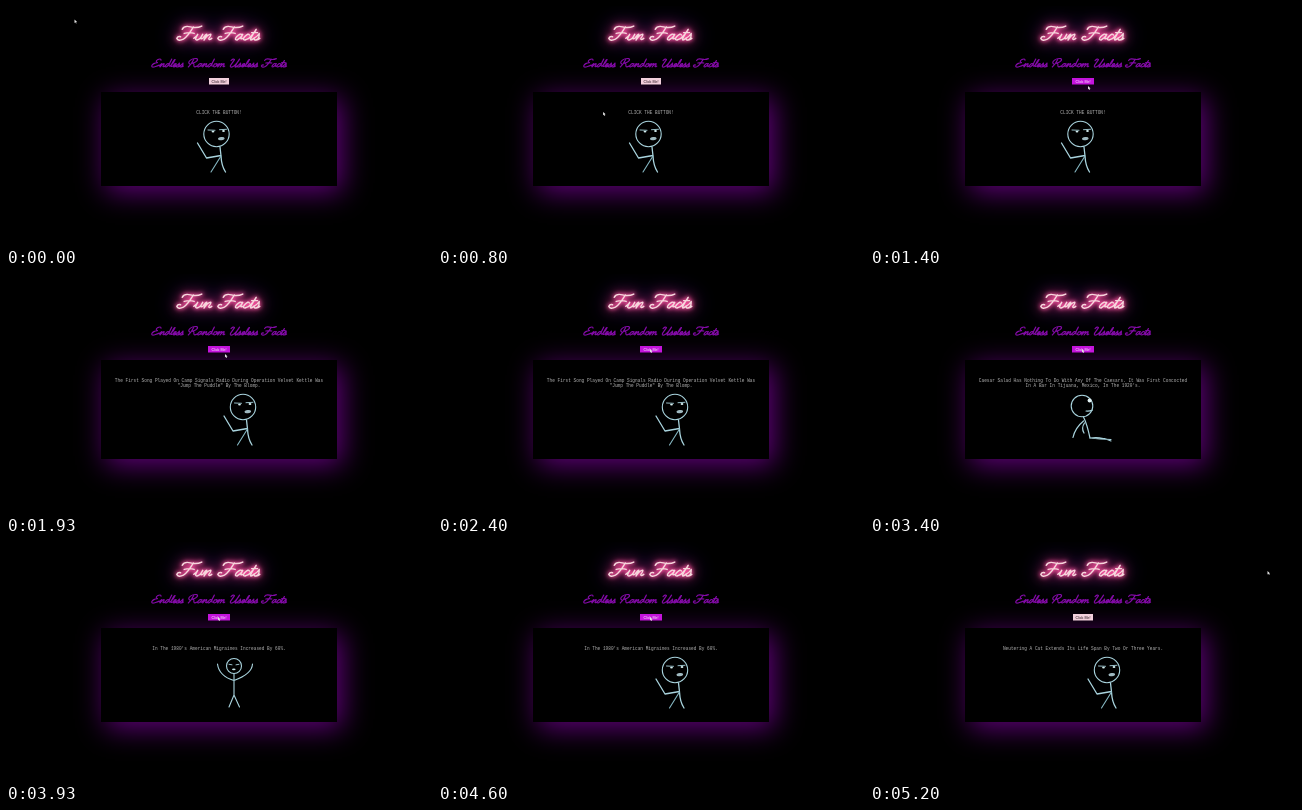
Write an HTML page with a canvas that moves like this. It is 426x240 px and loops after 5270 ms.

```html
<!DOCTYPE html>
<html lang="en">
<head>
<meta charset="utf-8">
<title>Fun Facts</title>
<style>
html, body { margin: 0; width: 100%; height: 100%; overflow: hidden; background: #000; }
canvas { display: block; width: 426px; height: 240px; }
</style>
</head>
<body>
<canvas id="stage" width="426" height="240" role="img" aria-label="Fun Facts: Endless Random Useless Facts"></canvas>
<script>
const ctx = document.getElementById('stage').getContext('2d');
const LOOP = 5270;

// Script lettering: advance width and pen strokes, baseline at 0.
const glyphs = {
  F: [17, 'M1 -13Q1 -18 8 -16T19 -17M11 -16Q10 -4 7 -1Q3 2 0 -2Q0 -5 3 -4M5 -8Q10 -10 15 -8'],
  E: [14, 'M12 -14Q10 -18 6 -15Q3 -11 8 -9Q1 -8 1 -3Q2 2 8 -1Q11 -2 13 -4'],
  R: [17, 'M6 -15Q6 -4 3 0M3 -6Q-2 -9 1 -14Q4 -18 10 -17Q15 -15 11 -10Q9 -8 6 -8Q10 -8 11 -3Q13 2 17 -2'],
  U: [15, 'M0 -13Q2 -18 5 -15Q4 -8 3 -4Q3 1 7 0Q12 -3 13 -16Q11 -4 12 0Q13 1 15 -2'],
  a: [8, 'M6 -6Q3 -9 1 -4Q0 0 3 0Q6 -2 6 -7Q5 0 8 -2'],
  c: [6, 'M5 -6Q3 -9 1 -4Q0 0 3 0Q5 -1 6 -2'],
  d: [9, 'M6 -6Q3 -9 1 -4Q0 0 3 0Q6 -2 6 -16Q5 0 9 -2'],
  e: [6, 'M0 -2Q6 -4 4 -7Q1 -8 1 -3Q2 2 6 -2'],
  l: [4, 'M0 -2Q4 -9 3 -15Q1 -16 1 -6Q1 1 4 -2'],
  m: [13, 'M0 -2Q1 -7 2 -7L2 0Q3 -7 6 -7Q7 -6 6 0Q7 -7 10 -7Q11 -6 10 -2Q11 1 13 -2'],
  n: [9, 'M0 -2Q1 -7 2 -7L2 0Q3 -7 6 -7Q7 -6 6 -2Q7 1 9 -2'],
  o: [7, 'M4 -7Q0 -7 1 -3Q2 1 5 -1Q7 -5 4 -7Q5 -5 7 -6'],
  s: [6, 'M0 -2Q3 -5 3 -8Q6 -1 3 0Q1 0 1 -1M3 0Q5 0 6 -2'],
  t: [5, 'M0 -2Q3 -8 3 -13Q1 0 3 0Q4 0 5 -2M0 -9L6 -9'],
  u: [9, 'M0 -2Q2 -5 2 -7Q1 0 4 0Q7 -1 7 -7Q6 0 9 -2']
};

function lettering(text, x, y, size) {
  const path = new Path2D();
  for (const ch of text) {
    if (ch === ' ') { x += 6 * size; continue; }
    const [advance, strokes] = glyphs[ch];
    path.addPath(new Path2D(strokes), new DOMMatrix([size, 0, -0.4 * size, 0.82 * size, x, y]));
    x += advance * size;
  }
  return path;
}

const title = lettering('Fun Facts', 170, 34, 1);
const subtitle = lettering('Endless Random Useless Facts', 144.5, 61, 0.6);

const scenes = [
  { at: 0, lines: ['CLICK THE BUTTON!'] },
  { at: 1800, lines: [
    'The First Song Played On Camp Signals Radio During Operation Velvet Kettle Was',
    '"Jump The Puddle" By The Blomp.'] },
  { at: 2700, lines: [
    'Caesar Salad Has Nothing To Do With Any Of The Caesars. It Was First Concocted',
    "In A Bar In Tijuana, Mexico, In The 1920's."] },
  { at: 3600, lines: ["In The 1980's American Migraines Increased By 60%."] },
  { at: 4730, lines: ['Neutering A Cat Extends Its Life Span By Two Or Three Years.'] }
];

const poses = [
  { at: 0, draw: thinking, x: 210.5 },
  { at: 1800, draw: thinking, x: 237 },
  { at: 2700, draw: sitting, x: 212 },
  { at: 3600, draw: cheering, x: 228 },
  { at: 4330, draw: thinking, x: 237 }
];

const pointer = [
  [0, 68.5, 13.5], [560, 68.5, 13.5], [800, 165, 106], [1400, 218, 80],
  [1930, 219, 80], [2400, 212, 75], [4800, 212, 75], [5200, 397.5, 29]
];

const current = (list, t) => list.filter(item => item.at <= t).pop();

function pointerAt(t) {
  const i = pointer.findIndex(k => k[0] > t);
  if (i < 0) return pointer[pointer.length - 1].slice(1);
  const [t0, x0, y0] = pointer[i - 1], [t1, x1, y1] = pointer[i];
  const p = (t - t0) / (t1 - t0);
  return [x0 + (x1 - x0) * p, y0 + (y1 - y0) * p];
}

function label(text, x, y, size, family, color) {
  ctx.save();
  ctx.translate(x, y);
  ctx.scale(0.1, 0.1);
  ctx.font = `${size * 10}px ${family}`;
  ctx.textAlign = 'center';
  ctx.fillStyle = color;
  ctx.fillText(text, 0, 0);
  ctx.restore();
}

function stroke(d, width = 1.1, color = '#a9d4de') {
  ctx.strokeStyle = color;
  ctx.lineWidth = width;
  ctx.stroke(d instanceof Path2D ? d : new Path2D(d));
}

function oval(x, y, rx, ry, color, angle = 0) {
  ctx.fillStyle = color;
  ctx.beginPath();
  ctx.ellipse(x, y, rx, ry, angle, 0, 7);
  ctx.fill();
}

function head(y, r) {
  const ring = new Path2D();
  ring.arc(0, y, r, 0, 7);
  stroke(ring);
}

// Figures stand around x = 0; y is measured in the short panel.
function thinking() {
  head(128, 12.7);
  stroke('M-8.5 124L-1.5 124.3M3 123.7L10 123.3', 0.9);
  oval(-3.5, 125.6, 1.4, 0.9, '#d5eef0');
  oval(7, 125, 1.4, 0.9, '#d5eef0');
  oval(4.8, 132.7, 3.3, 1.6, '#9fb9c0', -0.1);
  stroke('M3.5 141L4.5 150Q5 160 9 166M4.5 149.5L-10 152L-19 137', 1.3);
  stroke('M4.5 150L-5.5 166', 1.1, '#86b9c4');
}

function sitting() {
  head(127, 10.8);
  oval(7.6, 121.5, 2, 2, '#e4f4f6');
  stroke('M4 132Q7 132.5 10.5 131');
  stroke('M1.5 138Q5 145 8 159M1.5 142Q-7 149 -9 158.5M2.5 144Q-1 149 2 154', 1.2);
  stroke('M8 159Q18 157 29 162M8 159Q18 160 29 160.5');
}

function cheering() {
  head(124, 7.5);
  stroke('M-5 122.3L-2 122.8M2 122.8L5 122.3', 0.9);
  oval(-0.2, 127.3, 1.8, 0.9, '#c9e6ea');
  stroke('M0 132V153L-5 165M0 153L5.5 165M0 138.5Q-15 134 -16.5 122M0 138.5Q18 132 18.5 122');
}

function drawPanel(height) {
  ctx.save();
  ctx.shadowColor = '#60007a';
  ctx.shadowBlur = 27;
  ctx.shadowOffsetX = 5;
  ctx.shadowOffsetY = 6;
  ctx.fillStyle = '#000';
  ctx.fillRect(95, 86, 236, height);
  ctx.restore();
}

// Black strokes add nothing in "lighter" mode, so only their glow remains.
function glow(path, width, color, blur) {
  ctx.save();
  ctx.globalCompositeOperation = 'lighter';
  ctx.shadowColor = color;
  ctx.shadowBlur = blur;
  stroke(path, width, '#000');
  ctx.restore();
}

function drawTitles() {
  glow(title, 12, '#140630', 20);
  glow(title, 7, '#501018', 11);
  glow(title, 3, '#b04470', 4);
  stroke(title, 1.4, '#f6d6dc');
  stroke(subtitle, 1.15, '#820aa6');
}

function drawButton(hover) {
  ctx.fillStyle = hover ? '#c414dc' : '#f2d0dc';
  if (hover) ctx.fillRect(202, 72, 22, 6.5);
  else ctx.fillRect(203, 72, 20, 6.5);
  label('Click Me!', 213, 76.7, 3.7, 'bold "Liberation Sans", Arial, sans-serif'.replace('bold ', ''), hover ? '#fff' : '#201018');
}

function drawPointer(x, y) {
  ctx.save();
  ctx.translate(x, y);
  ctx.fillStyle = '#e4e4e4';
  ctx.fill(new Path2D('M0 0V3.4L.9 2.7L1.5 4L2.1 3.7L1.6 2.4H2.6Z'));
  ctx.restore();
}

function render(t) {
  const { lines } = current(scenes, t);
  const pose = current(poses, t);
  const extra = (lines.length - 1) * 5;
  const [px, py] = pointerAt(t);
  const hover = px > 202 && px < 224 && py > 71 && py < 82;

  ctx.fillStyle = '#000';
  ctx.fillRect(0, 0, 426, 240);
  ctx.lineCap = ctx.lineJoin = 'round';
  drawPanel(94 + extra);
  drawTitles();
  drawButton(hover);
  lines.forEach((line, i) =>
    label(line, 213, 107.7 + i * 5, 4.45, '"Liberation Mono", "Courier New", monospace', '#b4b4b4'));

  ctx.save();
  ctx.translate(pose.x, extra);
  pose.draw();
  ctx.restore();
  drawPointer(px, py);
}

function tick() {
  render(performance.now() % LOOP);
  requestAnimationFrame(tick);
}
tick();
</script>
</body>
</html>
```
